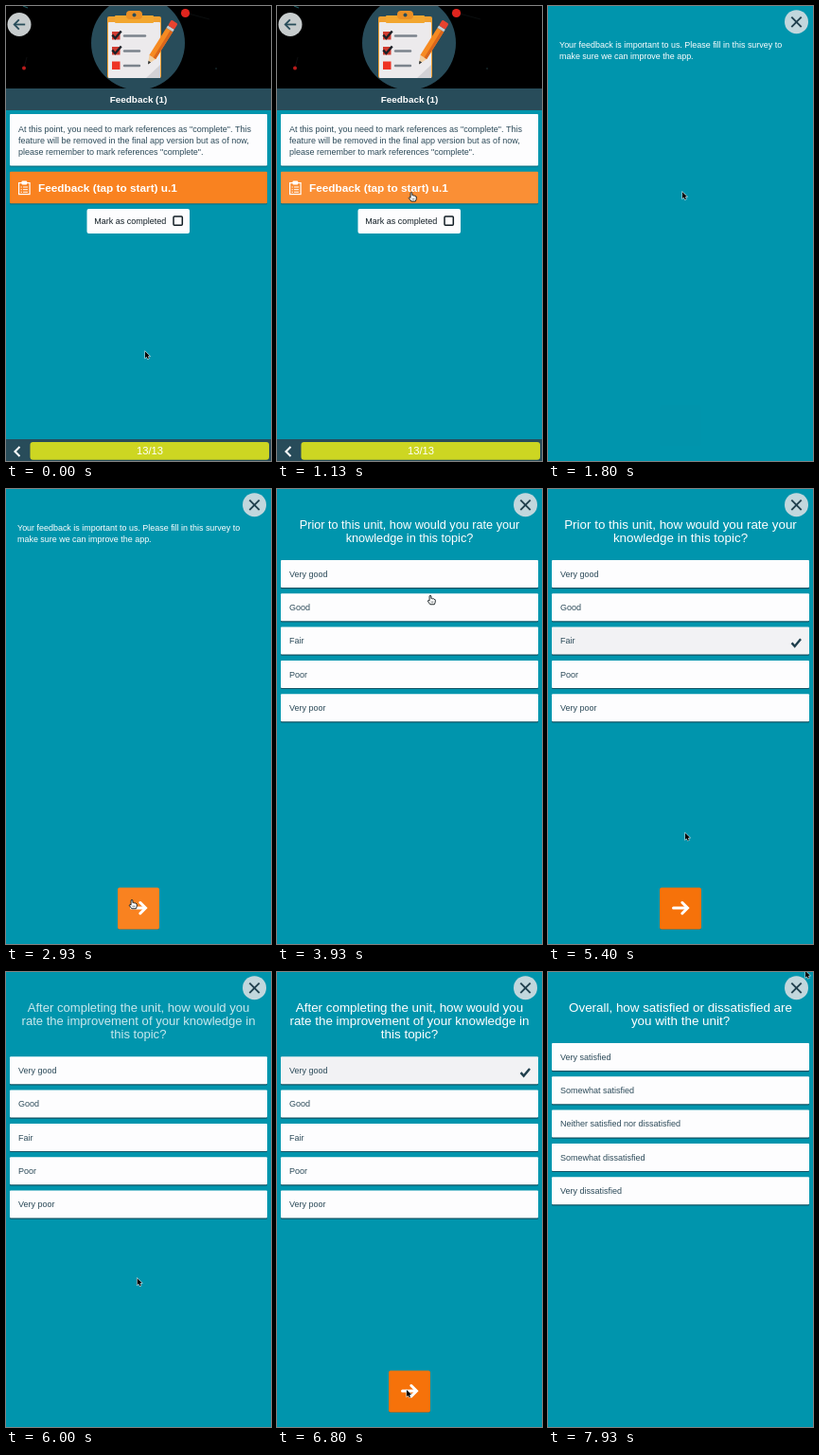
Write an HTML page with a canvas that moves like this. It is 280x480 px and loops after 8 s.

```html
<!DOCTYPE html>
<html lang="en">
<head>
<meta charset="utf-8">
<title>Feedback survey</title>
<style>
html, body { margin: 0; width: 100%; height: 100%; overflow: hidden; background: #0095ad; }
canvas { display: block; width: 100%; height: 100%; }
</style>
</head>
<body>
<canvas id="stage"></canvas>
<script>
const W = 280, H = 480, LOOP = 8000;
const TEAL = '#0095ad', NAVY = '#284c5a', INK = '#2c4a59', ORANGE = '#f98220', DEEP = '#f6720a', WHITE = '#fdfdfe';
const FONT = '"Liberation Sans", Arial, sans-serif';
const canvas = document.getElementById('stage');
const c = canvas.getContext('2d');

const levels = ['Very good', 'Good', 'Fair', 'Poor', 'Very poor'];
const satisfaction = ['Very satisfied', 'Somewhat satisfied', 'Neither satisfied nor dissatisfied',
  'Somewhat dissatisfied', 'Very dissatisfied'];
const questions = [
  { start: 3420, end: 5900, pick: 2, picked: 4600, options: levels,
    lines: ['Prior to this unit, how would you rate your', 'knowledge in this topic?'] },
  { start: 5900, end: 6890, pick: 0, picked: 6330, options: levels,
    lines: ['After completing the unit, how would you', 'rate the improvement of your knowledge in', 'this topic?'] },
  { start: 6890, end: LOOP, pick: -1, picked: Infinity, options: satisfaction,
    lines: ['Overall, how satisfied or dissatisfied are', 'you with the unit?'] }
];
const INTRO = 1800;

// Pointer stops: time, x, y
const path = [[0, 147, 364.5], [200, 147, 364.5], [1050, 142, 196.3], [2000, 142, 196.3], [2750, 133, 433],
  [3350, 133, 433], [3930, 162, 112], [4450, 150, 161], [4850, 150, 161], [5400, 145, 363],
  [5650, 138, 440], [5850, 138, 440], [6230, 140, 105], [6400, 140, 105], [6800, 137, 441],
  [6850, 137, 441], [7020, 140, 275], [7750, 262, 45], [7930, 272, -1], [8000, 272, -1]];
const zoom = [[0, .92], [230, 1.055], [510, .947], [700, 1.02], [850, 1]];

const clamp = v => Math.max(0, Math.min(1, v));
const smooth = u => u * u * (3 - 2 * u);

function sample(keys, t) {
  if (t <= keys[0][0]) return keys[0].slice(1);
  const i = keys.findIndex(k => k[0] >= t);
  if (i < 0) return keys[keys.length - 1].slice(1);
  const a = keys[i - 1], b = keys[i], u = smooth((t - a[0]) / (b[0] - a[0]));
  return a.slice(1).map((v, n) => v + (b[n + 1] - v) * u);
}

function text(s, x, y, size, color = '#fff', align = 'left', weight = 400) {
  c.font = `${weight} ${size}px ${FONT}`;
  c.fillStyle = color;
  c.textAlign = align;
  c.textBaseline = 'alphabetic';
  c.fillText(s, x, y);
}

function rect(x, y, w, h, color, r = 0) {
  c.fillStyle = color;
  c.beginPath();
  c.roundRect(x, y, w, h, r);
  c.fill();
}

function disc(x, y, r, color) {
  c.fillStyle = color;
  c.beginPath();
  c.arc(x, y, r, 0, 7);
  c.fill();
}

function line(points, color, width, cap = 'butt') {
  c.strokeStyle = color;
  c.lineWidth = width;
  c.lineCap = cap;
  c.lineJoin = 'miter';
  c.beginPath();
  points.forEach(([x, y]) => c.lineTo(x, y));
  c.stroke();
}

function poly(points, color) {
  c.fillStyle = color;
  c.beginPath();
  points.forEach(([x, y]) => c.lineTo(x, y));
  c.closePath();
  c.fill();
}

function panel(x, y, w, h, color, shade = .75) {
  rect(x, y + 1.2, w, h, `rgba(20,60,75,${shade})`, 1);
  rect(x, y, w, h, color, 1);
}

function tick(x, y, s, color, width) {
  line([[x - 5 * s, y], [x - 1.7 * s, y + 3.7 * s], [x + 5 * s, y - 4.3 * s]], color, width);
}

function clipboard() {
  disc(139.5, 39, 49.5, NAVY);
  rect(107, 11, 57, 65, '#f0a030', 2);
  rect(108, 17, 55, 59, '#eceaec', 1);
  poly([[163, 62], [163, 76], [148, 76]], '#d3d2d6');
  rect(115, 10, 41, 8, '#f2a62f', 1);
  rect(127, 5, 17, 9, '#e98f25', 4);
  disc(135.5, 9.5, 2, NAVY);
  [27, 43, 58.5].forEach((y, i) => {
    rect(112, y, 8.5, 8.5, i < 2 ? '#cf3b30' : '#ee3324');
    if (i < 2) tick(117, y + 3.5, .95, '#1b2026', 2.4);
    line([[125, y + 4.5], [i ? 141 : 147, y + 4.5]], '#7b838c', 2.4, 'round');
  });
  c.save();
  c.translate(150, 61.5);
  c.rotate(-1.01);
  poly([[0, 0], [9, -4], [9, 4]], '#f2cfa1');
  poly([[0, 0], [3.4, -1.5], [3.4, 1.5]], '#222b33');
  rect(9, -4, 34, 8, '#f68a22');
  rect(9, 1, 34, 3, '#d9661c');
  rect(43, -4, 3, 8, '#c9ced1');
  rect(46, -4, 7, 8, '#e8432f', 1.5);
  c.restore();
}

function start(hover) {
  rect(0, 0, W, 88, '#000');
  line([[18, 0], [23, 2]], '#1d5960', 1.2);
  line([[19, 65], [22, 54]], '#17191b', .6);
  line([[189, 7], [215, 14]], '#14181a', .6);
  disc(19, 65.5, 2, '#b91c1c');
  disc(222, 66, .8, '#233f43');
  disc(189.5, 7.5, 4.6, '#e0251e');
  clipboard();
  disc(14, 19.5, 12.5, '#c7cccd');
  line([[20.2, 19.5], [8.8, 19.5]], NAVY, 1.8);
  line([[13.8, 14.4], [8.7, 19.5], [13.8, 24.6]], NAVY, 1.8);

  rect(0, 87, W, 23, NAVY);
  text('Feedback (1)', 140, 102.2, 9.9, '#fff', 'center', 700);

  panel(4, 114, 272, 54.5, WHITE, .4);
  ['At this point, you need to mark references as "complete". This',
    'feature will be removed in the final app version but as of now,',
    'please remember to mark references "complete".'
  ].forEach((s, i) => text(s, 13, 132.8 + i * 12.2, 9, INK));

  panel(4, 174.7, 272, 33.5, hover ? '#fa8f35' : ORANGE, .4);
  c.strokeStyle = '#fff';
  c.lineWidth = 1.2;
  c.strokeRect(13.6, 186.6, 11.5, 12);
  rect(16.5, 184.5, 5.7, 4, '#fff', 1);
  [191, 193.7, 196.3].forEach(y => {
    rect(15.6, y - .5, 1.2, 1.1, '#fff');
    line([[18, y], [23, y]], '#fff', 1);
  });
  text('Feedback (tap to start) u.1', 34, 195.9, 11.8, '#fff', 'left', 700);

  rect(85.5, 214, 108.5, 26, WHITE, 2);
  text('Mark as completed', 93.3, 230.4, 9, '#111d24');
  c.strokeStyle = '#111d24';
  c.lineWidth = 1.5;
  c.beginPath();
  c.roundRect(177, 222, 9.3, 9.3, 1);
  c.stroke();

  rect(0, 457, W, 23, NAVY);
  line([[14.5, 465], [9.5, 470], [14.5, 475]], '#fff', 2.1);
  rect(25.5, 460, 252.5, 18.7, '#cdd622', 3);
  text('13/13', 152, 473.2, 11.2, '#fff', 'center');
}

function closeButton() {
  disc(262.5, 16.7, 12.5, '#c2d7dd');
  line([[257.3, 11.7], [267.7, 22.1]], '#203f4d', 1.9);
  line([[267.7, 11.7], [257.3, 22.1]], '#203f4d', 1.9);
}

function nextButton(alpha, hover) {
  if (alpha <= 0) return;
  c.save();
  c.globalAlpha = alpha;
  rect(118, 421, 44, 44, 'rgba(20,60,75,.35)', 2);
  rect(118, 420.5, 44, 44, hover ? ORANGE : DEEP, 2);
  line([[132.5, 442], [146.5, 442]], '#fff', 3, 'round');
  line([[141.8, 436.3], [147.5, 442], [141.8, 447.7]], '#fff', 3, 'round');
  c.restore();
}

const rowTop = (q, i) => 75 + (q.lines.length - 2) * 14.3 + i * 35.3;

function survey(q, t) {
  const mid = 44.2 + (q.lines.length - 2) * 7.1;
  const [s] = sample(zoom, t - q.start);
  c.save();
  c.globalAlpha = clamp((t - q.start + 40) / 180);
  c.translate(140, mid);
  c.scale(s, 1);
  q.lines.forEach((l, i) => text(l, 0, 41.8 - mid + i * 14.2, 13.4, '#fff', 'center'));
  c.restore();
  q.options.forEach((o, i) => {
    const y = rowTop(q, i), on = i === q.pick && t >= q.picked;
    panel(4, y, 272, 29, on ? '#f2f2f4' : WHITE);
    text(o, 13, y + 17.7, 9, INK);
    if (on) tick(262.3, y + 16.8, .95, '#203f4d', 2.4);
  });
}

function arrow(x, y) {
  c.save();
  c.translate(x, y);
  c.scale(.82, .82);
  c.beginPath();
  [[0, 0], [0, 8.3], [1.9, 6.6], [3.3, 9.6], [4.8, 8.9], [3.5, 6], [6, 5.8]].forEach(p => c.lineTo(...p));
  c.closePath();
  c.lineWidth = 1.3;
  c.strokeStyle = '#d5e4e8';
  c.stroke();
  c.fillStyle = '#000';
  c.fill();
  c.restore();
}

function hand(x, y) {
  c.save();
  c.translate(x, y);
  c.scale(.92, .92);
  c.beginPath();
  c.moveTo(-1, 6);
  c.lineTo(-1, 1);
  c.quadraticCurveTo(0, -.6, 1, 1);
  c.lineTo(1, 3.8);
  c.quadraticCurveTo(2.2, 3, 2.8, 4.2);
  c.quadraticCurveTo(4.2, 3.6, 4.5, 4.8);
  c.quadraticCurveTo(6, 4.6, 5.8, 6.4);
  c.quadraticCurveTo(5.8, 8.6, 4.7, 10.6);
  c.lineTo(-.2, 10.6);
  c.quadraticCurveTo(-1.6, 8.6, -3, 6.8);
  c.quadraticCurveTo(-2.6, 5, -1, 6.6);
  c.closePath();
  c.fillStyle = '#fff';
  c.fill();
  c.strokeStyle = '#10181c';
  c.lineWidth = 1;
  c.lineJoin = 'round';
  c.stroke();
  line([[1.2, 7], [1.2, 9]], '#10181c', .6);
  line([[3, 7], [3, 9]], '#10181c', .6);
  c.restore();
}

function draw(t) {
  const [x, y] = sample(path, t);
  const [hx, hy] = sample(path, Math.max(0, t - 120)); // hover reacts late
  const inside = (l, top, w, h) => hx >= l && hx <= l + w && hy >= top && hy <= top + h;
  const q = questions.find(k => t >= k.start && t < k.end);
  const overNext = inside(118, 420, 44, 45);
  let pointing = false;

  rect(0, 0, W, H, TEAL);
  if (t < INTRO) {
    pointing = inside(4, 175, 272, 34) || inside(85, 214, 109, 26);
    start(pointing);
  } else {
    let shown;
    if (q) {
      survey(q, t);
      shown = clamp((t - q.picked - 50) / 250);
      pointing = q.options.some((_, i) => inside(4, rowTop(q, i), 272, 31));
    } else {
      ['Your feedback is important to us. Please fill in this survey to',
        'make sure we can improve the app.'].forEach((s, i) => text(s, 12, 43.5 + i * 12.2, 8.95));
      shown = clamp((t - INTRO) / 400);
    }
    nextButton(shown, overNext);
    pointing = pointing || (shown > 0 && overNext);
    closeButton();
  }
  (pointing ? hand : arrow)(x, y);
}

function fit() {
  const d = window.devicePixelRatio || 1;
  const w = Math.round(innerWidth * d), h = Math.round(innerHeight * d);
  if (canvas.width !== w || canvas.height !== h) {
    canvas.width = w;
    canvas.height = h;
  }
  c.setTransform(w / W, 0, 0, h / H, 0, 0);
}

const origin = performance.now();
function frame() {
  fit();
  draw((performance.now() - origin) % LOOP);
  requestAnimationFrame(frame);
}
frame();
</script>
</body>
</html>
```
